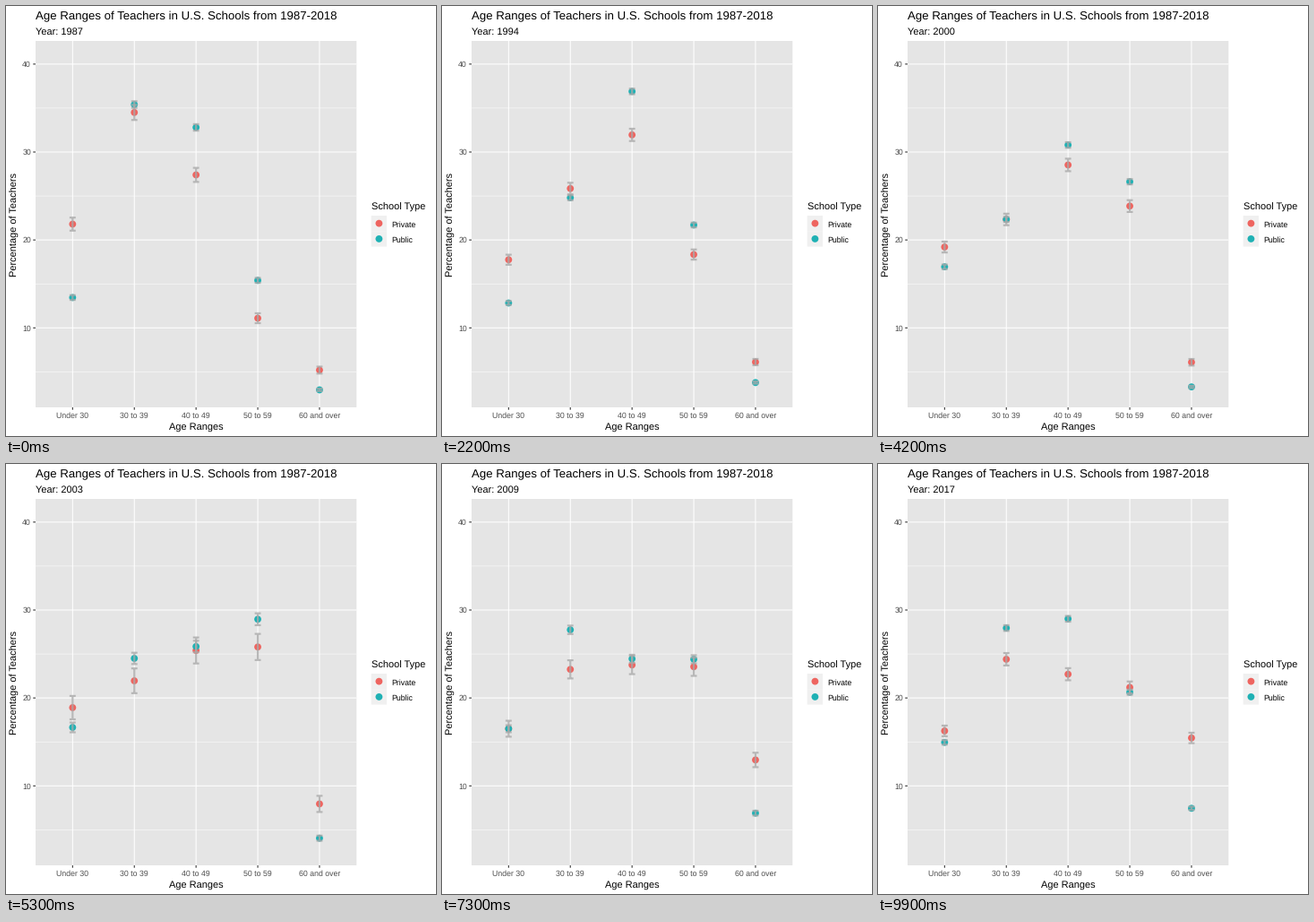
These frames come from a looping animation (480 by 480 pixels, 10 s). A matplotlib script:

```python
import numpy as np
import matplotlib.pyplot as plt
from matplotlib.animation import FuncAnimation
from matplotlib.patches import Circle, PathPatch, Rectangle
from matplotlib.path import Path

plt.rcParams.update({
    "font.family": "Liberation Sans",
    "text.hinting": "none",
    "path.snap": False,
    "toolbar": "None",
})

SIZE, DPI, FRAMES = 480, 72, 100
X0, X1, Y0, Y1 = 33, 391.3, 39, 448
START, END = 1987, 2017
AGES = ["Under 30", "30 to 39", "40 to 49", "50 to 59", "60 and over"]
COLORS = {"Private": "#EE6560", "Public": "#1FB1B4"}

# Turning points; shares run straight between them, 60 and over is the rest
YEARS = np.array([START, 1990, 1999, 2003, 2009, END])
SHARES = {
    "Private": [
        (21.8, 16.75, 19.25, 18.9, 16.5, 16.25),
        (34.5, 28.15, 22.4, 21.95, 23.25, 24.4),
        (27.4, 33.85, 29.1, 25.4, 23.75, 22.7),
        (11.1, 14.9, 23.5, 25.8, 23.55, 21.2),
    ],
    "Public": [
        (13.45, 10.05, 17.0, 16.65, 16.5, 14.95),
        (35.4, 26.7, 21.95, 24.5, 27.75, 27.95),
        (32.8, 40.35, 31.7, 25.85, 24.45, 29.0),
        (15.4, 18.7, 26.2, 28.95, 24.4, 20.65),
    ],
}
# Sampling error follows sqrt(p * (100 - p)), scaled by survey and sector
NOISE = (0.018, 0.0167, 0.0125, 0.034, 0.0245, 0.0165)
SECTOR = {"Private": 1, "Public": 0.44}

STEP = (X1 - X0) / 5.2
XS = X0 + STEP * (0.6 + np.arange(5))
KEYS = np.rint((YEARS - START) / (END - START) * (FRAMES - 1))


def to_y(value):
    return 359.3 - (value - 10) * 9.815


def estimate(kind, i):
    """Shares and error half lengths for all age ranges."""
    p = [np.interp(i, KEYS, row) for row in SHARES[kind]]
    p = np.array(p + [100 - sum(p)])
    noise = np.interp(i, KEYS, NOISE) * SECTOR[kind]
    return p, noise * np.sqrt(p * (100 - p))


fig = plt.figure(figsize=(SIZE / DPI, SIZE / DPI), dpi=DPI, facecolor="white")
ax = fig.add_axes([0, 0, 1, 1])
ax.set_xlim(0, SIZE)
ax.set_ylim(SIZE, 0)
ax.axis("off")


def box(x, y, w, h, color):
    ax.add_patch(Rectangle((x, y), w, h, fc=color, ec="none", zorder=0))


def line(xs, ys, color, lw=1.07):
    ax.plot(xs, ys, color=color, lw=lw, solid_capstyle="butt", zorder=1)


def label(x, y, text, size=8.8, color="black", **kw):
    return ax.text(x, y, text, fontsize=size, color=color, **kw)


def dot(x, y, color):
    return ax.add_patch(Circle((x, y), 3.9, fc=color, ec="none", zorder=3))


def error_bar():
    return ax.add_patch(PathPatch(
        Path([(0, 0), (1, 1)]), fc="none", ec="#A9A9A9", alpha=0.8,
        lw=2.13, capstyle="butt", zorder=4))


def whisker(x, low, high):
    left, right = x - STEP / 20, x + STEP / 20
    verts = [(left, high), (right, high), (x, high), (x, low),
             (left, low), (right, low)]
    return Path(verts, [Path.MOVETO, Path.LINETO] * 3)


# Panel, grid and axes
box(X0, Y0, X1 - X0, Y1 - Y0, "#E5E5E5")
for v in range(5, 45, 5):
    y, major = to_y(v), v % 10 == 0
    line([X0, X1], [y, y], "white", 1.07 if major else 0.53)
    if major:
        line([X0 - 2.75, X0], [y, y], "#333333")
        label(X0 - 5, y + 3.2, str(v), color="#4D4D4D", ha="right")
for x, age in zip(XS, AGES):
    line([x, x], [Y0, Y1], "white")
    line([x, x], [Y1, Y1 + 2.75], "#333333")
    label(x, 460, age, color="#4D4D4D", ha="center")

label(X0, 15, "Age Ranges of Teachers in U.S. Schools from 1987-2018", 13.2)
year_text = label(X0, 32, "", 11)
label((X0 + X1) / 2, 473, "Age Ranges", 11, ha="center")
label(13, (Y0 + Y1) / 2, "Percentage of Teachers", 11, rotation=90,
      rotation_mode="anchor", ha="center", va="baseline")

# Legend
label(407.7, 228, "School Type", 11)
for i, (kind, color) in enumerate(COLORS.items()):
    top = 234 + 17.28 * i
    box(407.7, top, 17.28, 17.28, "#F0F0F0")
    dot(416.4, top + 8.64, color)
    label(430.2, top + 12.8, kind)

points = {kind: [dot(x, 0, c) for x in XS] for kind, c in COLORS.items()}
bars = {kind: [error_bar() for _ in XS] for kind in COLORS}


def update(i):
    year = START + (END - START) * i / (FRAMES - 1)
    year_text.set_text(f"Year: {round(year)}")
    for kind in COLORS:
        for x, p, err, point, bar in zip(XS, *estimate(kind, i),
                                         points[kind], bars[kind]):
            point.center = x, to_y(p)
            bar.set_path(whisker(x, to_y(p - err), to_y(p + err)))
    return [year_text]


anim = FuncAnimation(fig, update, frames=FRAMES, interval=100, repeat=True,
                     repeat_delay=0)
plt.show()
```
